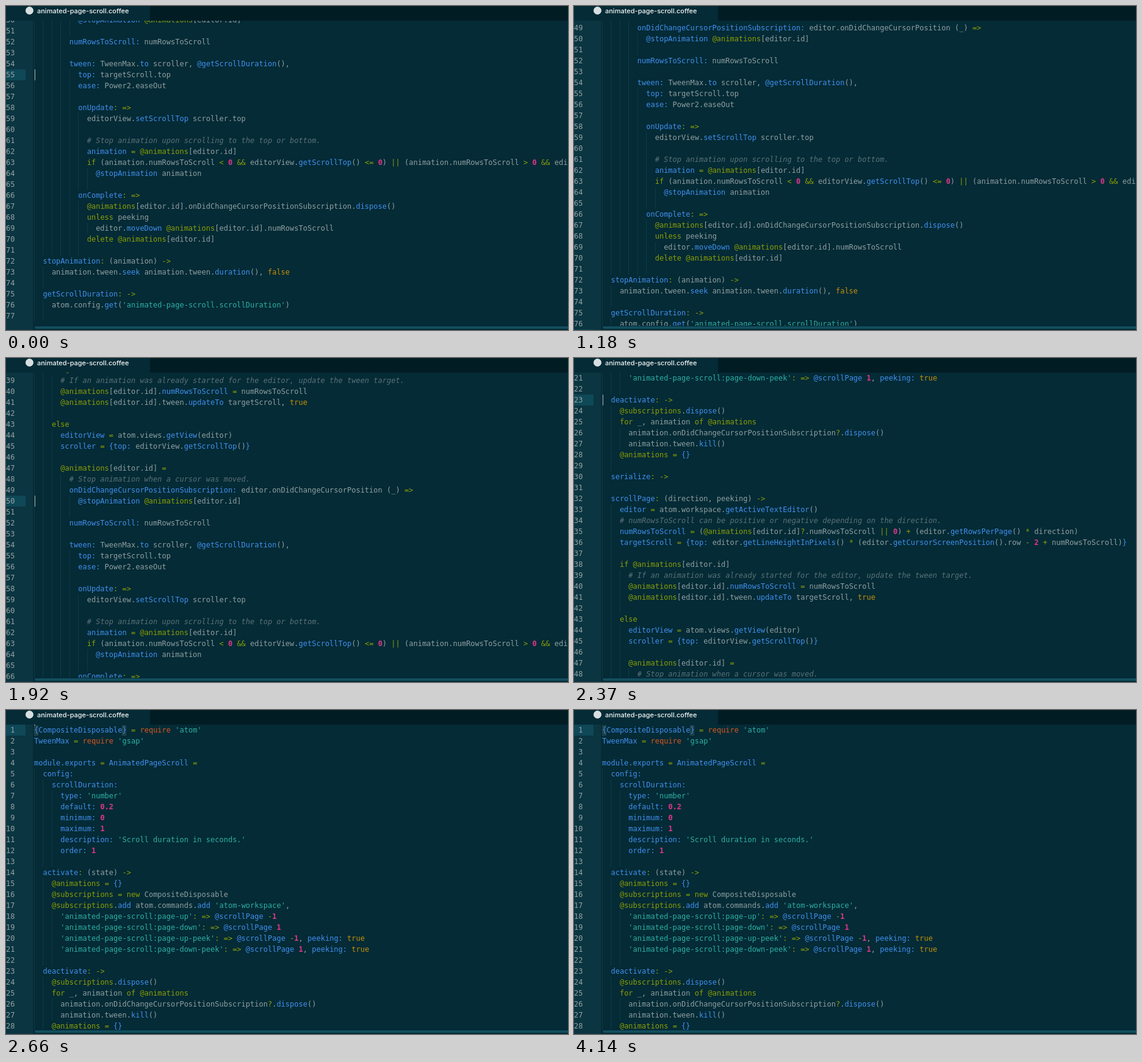
Recreate the animation shown at these times as an HTML page. Size 921 by 532 pixels, loop 4.39 s.

```html
<!DOCTYPE html>
<html lang="en">
<head>
<meta charset="utf-8">
<title>Page scroll in an editor</title>
<style>
  :root { --row: 18px; --loop: 4390ms; --bg: #042b36; --blue: #428fee; --green: #8c9f04; }
  html, body { margin: 0; width: 100%; height: 100%; overflow: hidden; background: var(--bg); }
  #stage { position: absolute; left: 0; top: 0; width: 921px; height: 532px; overflow: hidden; background: var(--bg); }

  #tabs { position: absolute; inset: 0 0 auto; height: 24px; background: #021c24; }
  #tab { width: 236px; height: 24px; background: var(--bg); }
  #icon { position: absolute; left: 32px; top: 1px; width: 13px; height: 13px; border-radius: 50%; background: #d9dfe0; }
  #title { position: absolute; left: 51px; top: 0; font: 500 11px/16px Inter, "Liberation Sans", sans-serif; color: #f4f7f7; white-space: nowrap; }

  #view { position: absolute; inset: 24px 0 0; overflow: hidden; font: 12px/18px "DejaVu Sans Mono", monospace; color: #909fa1; }
  #gutter { position: absolute; left: 0; top: 0; bottom: 0; width: 44px; background: #0a3541; }
  #page { position: absolute; inset: 0 0 auto; animation: scroll var(--loop) step-end infinite; }
  #mark { position: absolute; left: 0; top: 0; width: 32px; height: var(--row); background: #0f4857;
          animation: jump var(--loop) step-end infinite; }
  #caret { position: absolute; left: 46px; top: 0; width: 2px; height: var(--row); background: #a3b1b2;
           animation: blink var(--loop) step-end infinite; }
  .line { position: relative; height: var(--row); white-space: pre; }
  .num { position: absolute; left: 0; top: 0; color: #93a2a4; }
  .code { position: absolute; left: 46px; top: 0; }
  .guide { position: absolute; top: 0; width: 1px; height: var(--row); background: #0f3a45; }
  .pair { position: absolute; top: 1px; width: 7px; height: 17px; box-sizing: border-box; background: #173c45; border: 1px solid #25484f; }

  #foot { position: absolute; left: 44px; right: 0; bottom: 0; height: 7px; background: var(--bg); }
  #thumb { position: absolute; left: 3px; right: -4px; top: 1px; height: 4px; border-radius: 2px; background: #134e5e; }

  .name, .key { color: var(--blue); }
  .op, .word { color: var(--green); }
  .str { color: #2fb0a3; }
  .num2 { color: #e0368a; font-weight: bold; }
  .bool { color: #c59008; }
  .req { color: #d8571e; }
  .note { color: #5b7178; font-style: italic; }

  @keyframes scroll {
    0%      { transform: translateY(-892px); }
    26.879% { transform: translateY(-861px); }
    30.296% { transform: translateY(-846px); }
    43.735% { transform: translateY(-680px); }
    47.152% { transform: translateY(-360px); }
    57.175% { transform: translateY(-200px); }
    60.592%, 100% { transform: translateY(0); }
  }
  /* rows above the caret */
  @keyframes jump {
    0%      { transform: translateY(calc(54 * var(--row))); }
    13.439% { transform: translateY(calc(76 * var(--row))); }
    33.712% { transform: translateY(calc(49 * var(--row))); }
    47.152% { transform: translateY(calc(22 * var(--row))); }
    60.592%, 100% { transform: translateY(0); }
  }
  @keyframes blink {
    0%      { opacity: 1; }
    13.439% { opacity: .3; }
    16.856% { opacity: .75; }
    20.273% { opacity: 1; }
    33.712% { opacity: .6; }
    37.129% { opacity: 1; }
    47.152% { opacity: .3; }
    50.569% { opacity: .75; }
    53.986% { opacity: 1; }
    70.842% { opacity: .7; }
    74.259% { opacity: .2; }
    77.676% { opacity: .05; }
    80.865% { opacity: .5; }
    84.282% { opacity: .9; }
    87.699% { opacity: 1; }
    90.888% { opacity: .45; }
    94.305%, 100% { opacity: 0; }
  }
</style>
</head>
<body>
<div id="stage">
  <div id="view">
    <div id="gutter"></div>
    <div id="page"><div id="mark"></div></div>
    <div id="foot"><div id="thumb"></div></div>
  </div>
  <div id="tabs">
    <div id="tab"></div>
    <div id="icon"></div>
    <div id="title">animated-page-scroll.coffee</div>
  </div>
</div>
<script>
const source = `{CompositeDisposable} = require 'atom'
TweenMax = require 'gsap'

module.exports = AnimatedPageScroll =
  config:
    scrollDuration:
      type: 'number'
      default: 0.2
      minimum: 0
      maximum: 1
      description: 'Scroll duration in seconds.'
      order: 1

  activate: (state) ->
    @animations = {}
    @subscriptions = new CompositeDisposable
    @subscriptions.add atom.commands.add 'atom-workspace',
      'animated-page-scroll:page-up': => @scrollPage -1
      'animated-page-scroll:page-down': => @scrollPage 1
      'animated-page-scroll:page-up-peek': => @scrollPage -1, peeking: true
      'animated-page-scroll:page-down-peek': => @scrollPage 1, peeking: true

  deactivate: ->
    @subscriptions.dispose()
    for _, animation of @animations
      animation.onDidChangeCursorPositionSubscription?.dispose()
      animation.tween.kill()
    @animations = {}

  serialize: ->

  scrollPage: (direction, peeking) ->
    editor = atom.workspace.getActiveTextEditor()
    # numRowsToScroll can be positive or negative depending on the direction.
    numRowsToScroll = (@animations[editor.id]?.numRowsToScroll || 0) + (editor.getRowsPerPage() * direction)
    targetScroll = {top: editor.getLineHeightInPixels() * (editor.getCursorScreenPosition().row - 2 + numRowsToScroll)}

    if @animations[editor.id]
      # If an animation was already started for the editor, update the tween target.
      @animations[editor.id].numRowsToScroll = numRowsToScroll
      @animations[editor.id].tween.updateTo targetScroll, true

    else
      editorView = atom.views.getView(editor)
      scroller = {top: editorView.getScrollTop()}

      @animations[editor.id] =
        # Stop animation when a cursor was moved.
        onDidChangeCursorPositionSubscription: editor.onDidChangeCursorPosition (_) =>
          @stopAnimation @animations[editor.id]

        numRowsToScroll: numRowsToScroll

        tween: TweenMax.to scroller, @getScrollDuration(),
          top: targetScroll.top
          ease: Power2.easeOut

          onUpdate: =>
            editorView.setScrollTop scroller.top

            # Stop animation upon scrolling to the top or bottom.
            animation = @animations[editor.id]
            if (animation.numRowsToScroll < 0 && editorView.getScrollTop() <= 0) || (animation.numRowsToScroll > 0 && editorView
              @stopAnimation animation

          onComplete: =>
            @animations[editor.id].onDidChangeCursorPositionSubscription.dispose()
            unless peeking
              editor.moveDown @animations[editor.id].numRowsToScroll
            delete @animations[editor.id]

  stopAnimation: (animation) ->
    animation.tween.seek animation.tween.duration(), false

  getScrollDuration: ->
    atom.config.get('animated-page-scroll.scrollDuration')
`;

const arrow = String.raw`: (?:\([^)]*\) )?[-=]>`;
const rules = [
  ['note', /#.*/],
  ['str', /'[^']*'/],
  ['name', new RegExp(String.raw`^\s*\w+(?=${arrow})`)],
  ['op', new RegExp(`:(?=${arrow.slice(1)})`)],
  ['key', /\w+:/],
  ['name', /@(?:scrollPage|stopAnimation|getScrollDuration)/],
  ['word', /@\w+|\b(?:for|of|if|else|unless|new|delete)\b/],
  ['req', /\brequire\b/],
  ['bool', /\b(?:true|false)\b/],
  ['name', /^\s*[\w.]+(?= =)|\w+(?= =$)|[{}]|(?<=\{)\w+(?=\})/],
  ['name', /(?<=\.)\w+(?=\(| =| [\w'@])/],
  ['num2', /\b\d+(?:\.\d+)?\b/],
  ['op', /[-=]>|&&|\|\||<=|[-=<>*+?]/]
];
const lexer = new RegExp(rules.map(r => `(${r[1].source})`).join('|'), 'g');
const escapeHtml = s => s.replace(/&/g, '&amp;').replace(/</g, '&lt;');

function paint(line) {
  return line.replace(lexer, (text, ...parts) => {
    const kind = rules[parts.slice(0, rules.length).findIndex(p => p !== undefined)][0];
    return `<span class="${kind}">${escapeHtml(text)}</span>`;
  });
}

const lines = source.split('\n');
const indent = line => line.search(/\S/);
const near = (i, step) => {
  while (lines[i] === '') i += step;
  return lines[i] ? indent(lines[i]) : 0;
};

function guides(i) {
  const depth = Math.max(near(i, -1), near(i, 1)) / 2;
  let html = '';
  for (let k = 0; k < depth; k++) {
    html += `<i class="guide" style="left:${Math.round(46 + k * 14.448)}px"></i>`;
  }
  return html;
}

const pairs = [46, 190].map(x => `<i class="pair" style="left:${x}px"></i>`).join('');
const page = document.getElementById('page');
page.insertAdjacentHTML('beforeend', lines.map((line, i) =>
  `<div class="line">${guides(i)}${i ? '' : pairs}` +
  `<span class="num">${String(i + 1).padStart(2)}</span>` +
  `<span class="code">${paint(line)}</span></div>`).join(''));
document.getElementById('mark').insertAdjacentHTML('beforeend', '<div id="caret"></div>');
</script>
</body>
</html>
```
